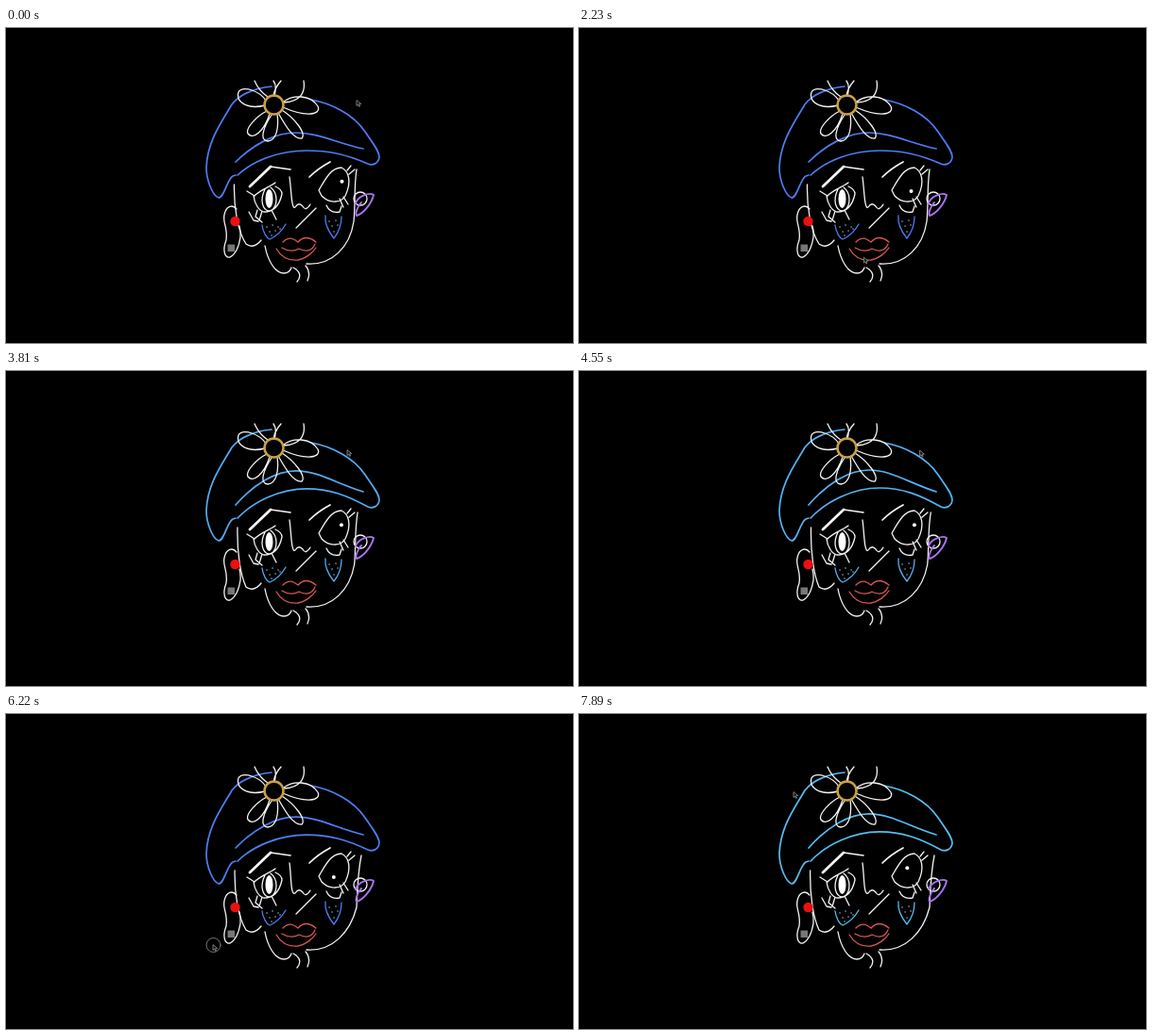
These frames come from a looping animation (600 by 334 pixels, 7990 ms). An HTML page:

```html
<!DOCTYPE html>
<html lang="en">
<head>
<meta charset="utf-8">
<title>Line portrait</title>
<style>
html, body { margin: 0; width: 100%; height: 100%; overflow: hidden; background: #000; }
svg { display: block; width: 600px; height: 334px; }
path, circle { fill: none; stroke-width: 1.3; stroke-linecap: round; stroke-linejoin: round; }
.ink { stroke: #f4f4f4; }
.hat { stroke-width: 1.7; }
.lips { stroke: #d9575a; }
.fill { fill: #fff; stroke: none; }
</style>
</head>
<body>
<svg viewBox="0 0 600 334">
  <g id="blue">
    <path class="hat" d="M281 62C262 64 247 71 239 81C228 100 213 120 212 148C212 162 219 178 225 180C231 180 234 160 240 157L243 156"/>
    <path class="hat" id="brim"/>
    <path class="hat" id="band"/>
    <path d="M271 209C272 217 276 223 279 224C286 221 292 215 296 208M338 199C337 208 343 218 347 223C351 218 355 211 355 200"/>
  </g>
  <path id="freckles" stroke="#a9cdf4" d="M276 211h.1M282 209h.1M288 211h.1M279 216h.1M285 215h.1M290 213h.1M281 220h.1M342 205h.1M349 204h.1M345 210h.1M351 209h.1M347 216h.1"/>

  <g class="ink">
    <path d="M275 77C268 66 250 61 246 68C243 78 255 87 274 82M276 88C266 93 253 106 256 112C261 119 273 110 279 91M281 92C272 106 268 119 277 120C286 119 289 107 287 91M288 90C296 104 304 118 313 117C318 112 306 96 292 87M294 78C303 71 322 70 330 83C334 92 318 95 293 84M315 56C317 68 312 78 294 79M263 56C266 63 271 69 277 73M283 56Q287 61 284 72M291 56Q284 64 283 72"/>
    <path stroke-width="3" style="stroke-width:2.8" d="M258 168L280 147"/>
    <path style="stroke-width:1.7" d="M280 147L301 150M321 158Q330 149 343 142"/>
    <path d="M255 173L263 178C268 172 280 168 285 164M262 178C263 187 268 194 273 195C281 195 289 190 292 176Q292 171 285 168M274 171C268 183 272 193 278 194M280 169C288 175 288 189 280 194M266 193L264 200L271 206M271 194L268 204M281 193L286 203M257 195L262 204L267 205"/>
    <path d="M331 172C338 160 344 148 355 148C363 152 366 163 359 178C355 185 343 187 334 178ZM361 151L365 146M363 155L369 150M353 181L357 190M357 179L362 187M339 188Q343 197 353 195L355 189"/>
    <path id="nose"/>
    <path d="M328 191Q317 202 307 212"/>
    <path id="cheek"/>
    <path id="temple"/>
    <path d="M274 231C277 247 285 260 294 260Q300 260 302 254M304 254C311 258 313 263 308 269M317 252Q323 259 319 268"/>
    <path d="M244 192C240 187 233 188 231 198C229 207 235 211 233 225C229 235 231 244 237 243C243 240 246 234 248 222Q248.500 215 247 210"/>
    <circle cx="375" cy="181" r="7"/>
  </g>
  <circle cx="283.500" cy="81.500" r="10" stroke="#c9a043" style="stroke-width:2.500"/>
  <path stroke="#e06a58" d="M298 77h.1"/>
  <ellipse class="fill" cx="278.500" cy="181" rx="4" ry="10"/>
  <circle class="fill" id="pupil" r="2"/>
  <path class="lips" d="M293 227C300 220 305 224 309 227C314 221 321 221 328 227M292 233C297 236 303 238 310 234C318 238 324 236 327 229M286 234C292 244 300 247 309 246C316 245 324 239 328 233"/>
  <path stroke="#a873ee" style="stroke-width:1.900" d="M370 186C372 178 385 174 389 177C387 186 378 197 371 199C369 196 373 188 376 185"/>
  <circle cx="242.500" cy="205" r="5.200" style="fill:#ec1010"/>
  <rect x="234.500" y="229.500" width="7.500" height="7.500" fill="#777"/>
  <g id="cursor">
    <circle id="ring" cx=".5" cy="0" r="7.500" stroke="#777" style="stroke-width:1"/>
    <path d="M0 0V5.500L1.500 4.200L2.700 6.500L3.500 6L2.500 3.800L4.300 3.600Z" stroke="#aaa" style="fill:#111;stroke-width:.7"/>
  </g>
</svg>
<script>
const LOOP = 7990, STEP = LOOP / 86;
const el = id => document.getElementById(id);

// time, x, y
const pointer = [
  [370, 371, 77], [740, 380, 195], [1110, 310, 235], [1390, 308, 149],
  [1700, 200, 205], [1900, 214, 260], [2300, 320, 240], [2600, 398, 180],
  [2880, 374, 110], [3060, 361, 84], [4550, 361, 84], [4920, 300, 165],
  [5290, 228, 238], [5480, 222, 243], [5850, 219, 245], [7240, 219, 245],
  [7890, 227, 83]
];
// time, brim lift, face width, colour shift, temple shift
const look = [
  [3240, 0, 0, 0, 0], [3900, 1, .25, 1, 1], [5480, 1, .25, 1, 1],
  [5850, .3, 1, .05, .15], [6410, .3, 1, .05, .15], [7240, .85, 1, 1.2, .8]
];

function at(keys, t) {
  const i = keys.findIndex(k => k[0] > t);
  if (i < 1) return (i ? keys[keys.length - 1] : keys[0]).slice(1);
  const a = keys[i - 1], b = keys[i], f = (t - a[0]) / (b[0] - a[0]);
  return a.slice(1).map((v, n) => v + (b[n + 1] - v) * f);
}

function draw(now) {
  const time = now % LOOP;
  const t = Math.floor((time + 9) / STEP) * STEP;
  const [x, y] = at(pointer, t);
  const [lift, wide, shift, side] = at(look, t);
  const path = (id, d) => el(id).setAttribute('d', d);

  path('brim', `M323 76C345 80 368 92 380 110C388 122 395 130 395 137C394 144 388 146 383 144
    C360 ${134 - 3 * lift} 342 ${130 - 6 * lift} 318 ${130 - 6 * lift}
    C290 ${130 - 6 * lift} 262 ${140 - 2 * lift} 245 156`);
  path('band', `M243 142C262 ${123 - 3 * lift} 285 ${111 - 6 * lift} 307 ${111 - 6 * lift}
    C330 ${111 - 6 * lift} 350 ${122 - 3 * lift} 378 128`);
  path('cheek', `M${371 + 5 * wide} 150C${368 + 4 * wide} 170 ${370 + 2 * wide} 185 ${368 + 3 * wide} 205C364 232 345 252 318 250`);
  path('temple', `M${241.5 + 4 * side} 166C${241 + 4 * side} 190 ${245 + 3 * side} 215 254 229Q262 235 270 225`);
  path('nose', `M300 158C302 172 ${302 - wide} 193 306 190Q310 184 314 189Q317 195 322 187`);

  const rgb = [[78, 85], [124, 178], [245, 242]].map(([a, b]) => a + (b - a) * shift);
  el('blue').setAttribute('stroke', `rgb(${rgb})`);
  el('pupil').setAttribute('cx', 347 + .057 * (x - 222));
  el('pupil').setAttribute('cy', 163 + .061 * (y - 80));
  el('cursor').setAttribute('transform', `translate(${x} ${y})`);
  el('ring').style.display = time >= 6215 && time < 6310 ? '' : 'none';
}

const start = performance.now();
(function frame() {
  draw(performance.now() - start);
  requestAnimationFrame(frame);
})();
</script>
</body>
</html>
```
